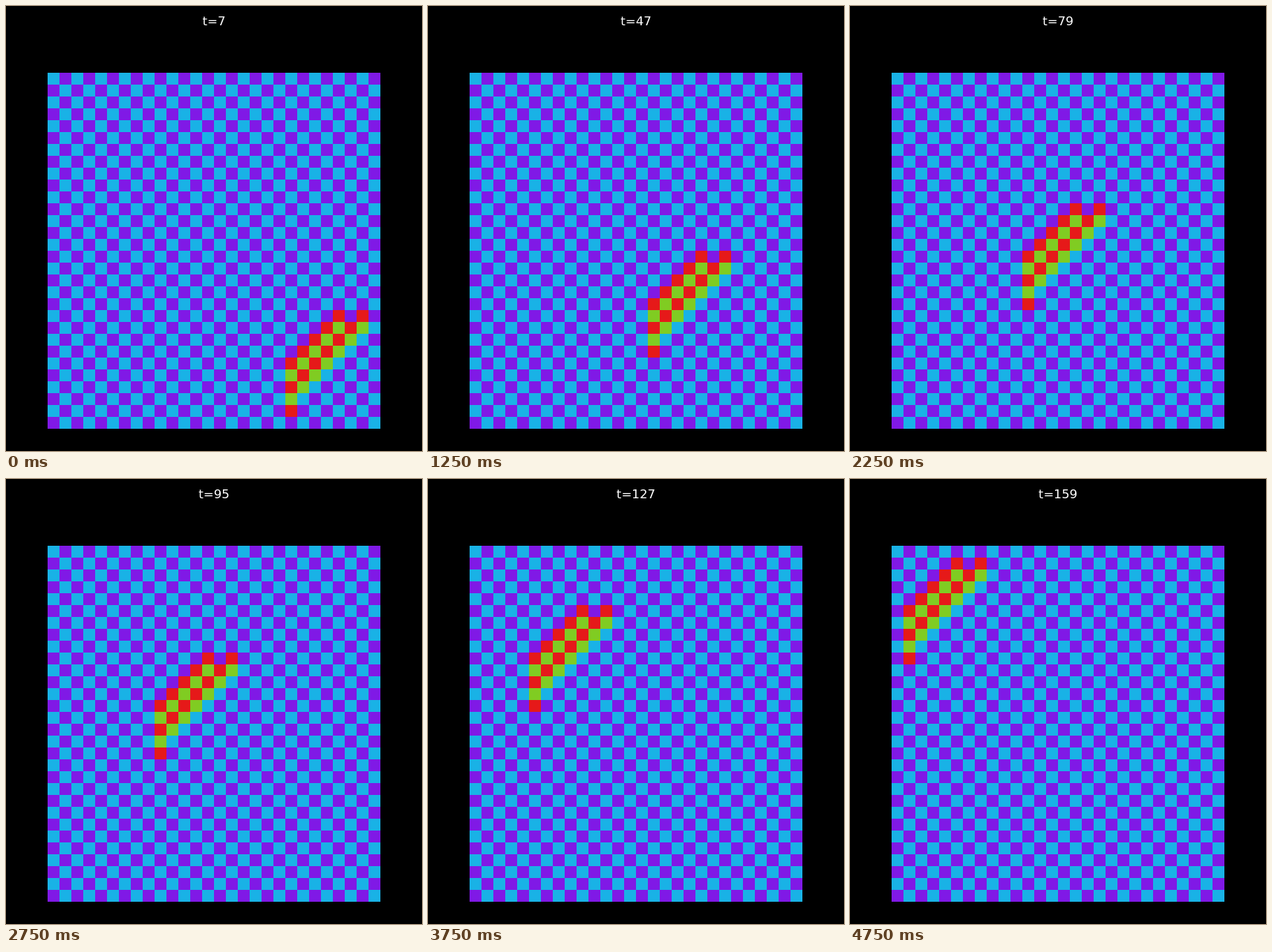
These frames come from a looping animation (560 px wide and 600 px high, 5000 ms). An HTML page with a canvas:

```html
<!DOCTYPE html>
<html lang="en">
<head>
<meta charset="utf-8">
<title>Glider on a checkerboard</title>
<style>
  html, body { margin: 0; width: 100%; height: 100%; overflow: hidden; background: #000; }
  canvas { display: block; }
</style>
</head>
<body>
<canvas width="560" height="600"></canvas>
<script>
const ctx = document.querySelector("canvas").getContext("2d");
const CELL = 16, COLS = 28, ROWS = 30, LEFT = 56, TOP = 90;
const STEP_MS = 250, STEPS = 20;
const BOARD = ["#19b2e6", "#8019e6"];
const SHAPE = ["#e61919", "#80cc22"];
const GLIDER = [
  "....#.#",
  "...####",
  "..####",
  ".####",
  "####",
  "###",
  "##",
  "#",
  "#"
];

function fillCell(col, row, colors) {
  ctx.fillStyle = colors[(col + row) % 2];
  ctx.fillRect(LEFT + col * CELL, TOP + row * CELL, CELL, CELL);
}

function draw(step) {
  ctx.fillStyle = "#000";
  ctx.fillRect(0, 0, 560, 600);

  for (let row = 0; row < ROWS; row++)
    for (let col = 0; col < COLS; col++) fillCell(col, row, BOARD);

  // The glider moves one cell up and left per step.
  const corner = 20 - step;
  GLIDER.forEach((line, row) => [...line].forEach((mark, col) => {
    if (mark === "#") fillCell(corner + col, corner + row, SHAPE);
  }));

  ctx.fillStyle = "#fff";
  ctx.font = '16.67px "DejaVu Sans", sans-serif';
  ctx.textAlign = "center";
  ctx.fillText("t=" + (7 + 8 * step), 280, 26);
}

const start = performance.now();
function tick() {
  const elapsed = performance.now() - start;
  draw(Math.floor(elapsed / STEP_MS) % STEPS);
  requestAnimationFrame(tick);
}
tick();
</script>
</body>
</html>
```
